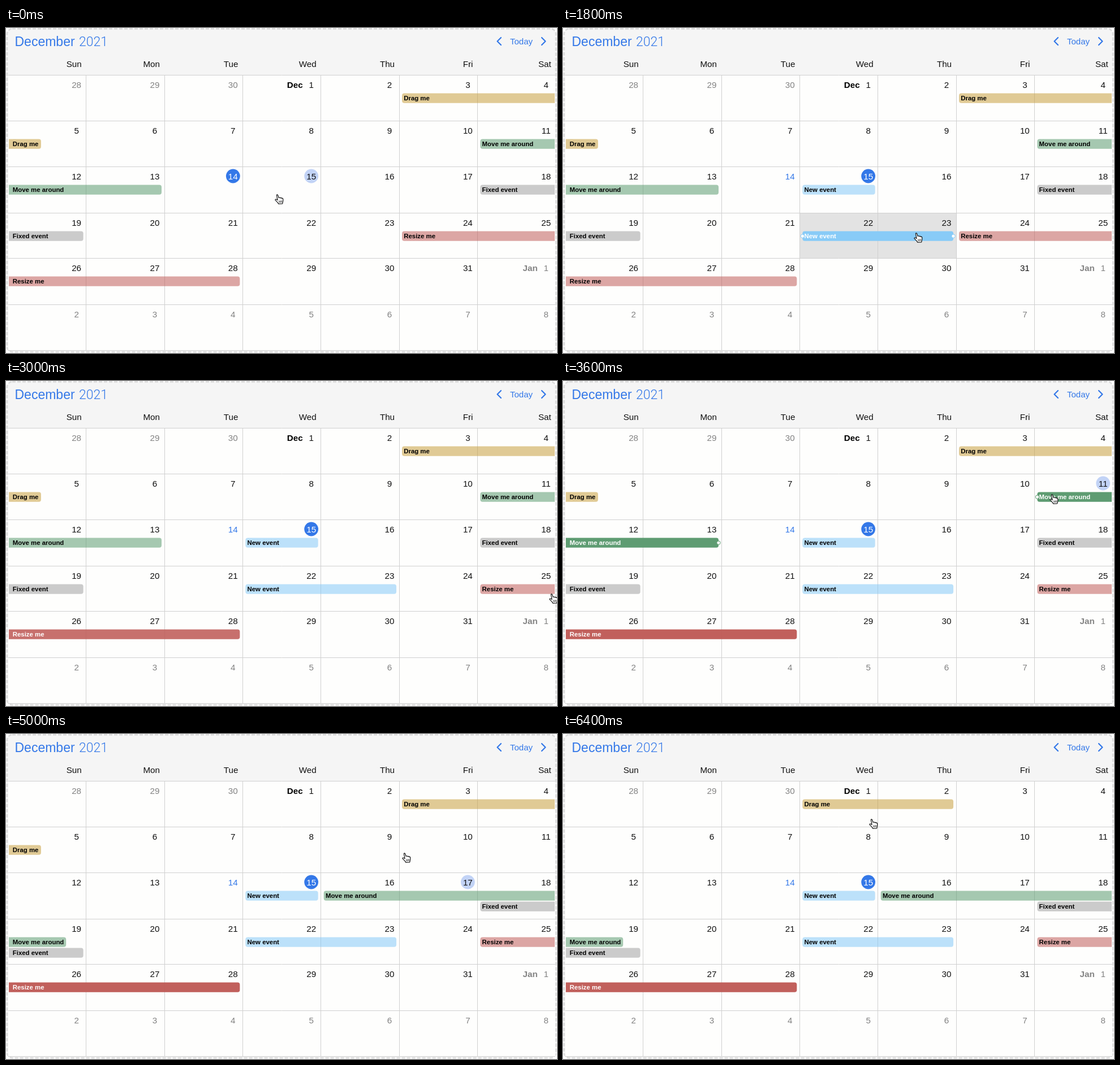
Animation of 974x575 px, one loop 6.6 s. Source, as an HTML page with a canvas:

```html
<!DOCTYPE html>
<html lang="en">
<head>
<meta charset="utf-8">
<title>Calendar</title>
<style>
html, body { margin: 0; width: 100%; height: 100%; overflow: hidden; background: #fff; }
canvas { display: block; width: 974px; height: 575px; }
</style>
</head>
<body>
<canvas id="stage" width="974" height="575"></canvas>
<script>
const ctx = document.getElementById('stage').getContext('2d');
const SANS = '"Liberation Sans", Arial, sans-serif';
const STEP = 200, STEPS = 33;
const BLUE = '#3478e8', MUTED = '#828282';
const LEFT = 3.3, COL = 138.35, EDGE_L = 5, EDGE_R = 970;
const ROWS = [83, 164, 245, 327, 407, 489, 570];
const DAYS = ['Sun', 'Mon', 'Tue', 'Wed', 'Thu', 'Fri', 'Sat'];
const COLORS = { tan: '#c7a03e', green: '#5b9b70', gray: '#a1a1a1', red: '#c05d59', blue: '#85caf8' };
const ALPHA = { normal: 0.54, selected: 0.98, drag: 0.96, ghost: 0.2 };

// Cursor keys: step, x, y
const PATH = [
  [0, 483, 303], [2, 483, 303], [5, 466, 350], [6, 462, 361], [7, 470, 364],
  [8, 580, 369], [9, 628, 371], [10, 665, 373], [11, 735, 376], [12, 787, 377],
  [13, 701, 369], [14, 860, 373], [15, 968, 385], [16, 960, 330], [17, 915, 240],
  [18, 868, 209], [19, 842, 270], [20, 714, 304], [21, 665, 303], [22, 668, 302],
  [23, 698, 280], [24, 708, 250], [25, 708, 219], [26, 718, 165], [27, 722, 129],
  [28, 718, 132], [29, 645, 145], [30, 553, 157], [32, 549, 159]
];

const HAND = new Path2D('M-4.5-6.5C-5-8.4-2.8-8.8-2.3-7L-.9-2.6C-.3-3.6 1.6-3.4 1.9-2.2C2.6-3.1 4.2-2.7 4.4-1.6' +
  'C5.3-2.2 6.7-1.5 6.7-.2C7.2 3 6.4 5 5.6 7.8L-1.2 8.2C-2 5.8-4.6 3.9-6.8 1.6C-7.6.2-5.6-.6-4.2.6L-3 1.4Z');
const FINGERS = new Path2D('M-.3 2.6L.2 6M2 2.4L2.3 6M4.2 2.2L4.3 5.6');
const ARROW = new Path2D('M0-7.5L3.2-4H1.1V-1.1H4V-3.2L7.5 0L4 3.2V1.1H1.1V4H3.2L0 7.5L-3.2 4H-1.1V1.1H-4V3.2L-7.5 0L-4-3.2V-1.1H-1.1V-4H-3.2Z');

const colX = c => LEFT + COL * c;
const between = (k, a, b) => k >= a && k <= b;

function cursorAt(k) {
  const i = PATH.findIndex(p => p[0] >= k);
  if (i < 1) return PATH[0].slice(1);
  const [ka, xa, ya] = PATH[i - 1], [kb, xb, yb] = PATH[i];
  const u = (k - ka) / (kb - ka);
  return [xa + (xb - xa) * u, ya + (yb - ya) * u];
}

function cellAt(x, y) {
  const row = ROWS.findIndex((top, i) => y >= top && y < ROWS[i + 1]);
  return row * 7 + Math.min(6, Math.floor((x - LEFT) / COL));
}

const dragging = k => between(k, 7, 9) || k === 14 || moving(k);
const moving = k => between(k, 19, 21) || between(k, 28, 31);

// Days count from the first cell; an end is exclusive and may be fractional.
function eventsAt(k) {
  const list = [];
  const add = (title, color, start, end, mode = 'normal', slot = 0) =>
    list.push({ title, color, start, end, mode, slot });

  add('Fixed event', 'gray', 20, 22, 'normal', k >= 22 ? 1 : 0);
  if (k >= 1) add('New event', 'blue', 17, 18, between(k, 1, 2) ? 'selected' : 'normal');
  if (k >= 7) add('New event', 'blue', 24, k < 8 ? 25 : 26, k < 10 ? 'drag' : 'normal');

  if (k === 14) add('Resize me', 'red', 26, 31, 'ghost');
  add('Resize me', 'red', k < 14 ? 26 : 27, 31,
    between(k, 12, 13) ? 'selected' : k === 14 ? 'drag' : 'normal');

  const moveTitle = 'Move me around';
  if (k < 19) add(moveTitle, 'green', 13, 16, k === 18 ? 'selected' : 'normal');
  else if (k < 22) {
    const start = cellAt(...cursorAt(k));
    add(moveTitle, 'green', 13, 16, 'ghost');
    add(moveTitle, 'green', start, start + 3, 'drag');
  } else add(moveTitle, 'green', 18, 21.78);

  if (k < 28) add('Drag me', 'tan', 5, 7.46, k === 27 ? 'selected' : 'normal');
  else if (k < 32) {
    const start = cellAt(...cursorAt(k));
    add('Drag me', 'tan', 5, 7.46, 'ghost');
    add('Drag me', 'tan', start, start + 2.46, 'drag');
  } else add('Drag me', 'tan', 3, 5);
  return list;
}

function text(str, x, y, size, color, align = 'left', weight = 400, family = SANS) {
  ctx.font = `${weight} ${size}px ${family}`;
  ctx.textAlign = align;
  ctx.fillStyle = color;
  ctx.fillText(str, x, y);
}

function disc(x, y, r, fill) {
  ctx.beginPath();
  ctx.arc(x, y, r, 0, Math.PI * 2);
  ctx.fillStyle = fill;
  ctx.fill();
}

function line(points, color, width) {
  ctx.beginPath();
  points.forEach(([x, y]) => ctx.lineTo(x, y));
  ctx.strokeStyle = color;
  ctx.lineWidth = width;
  ctx.stroke();
}

function drawFrame() {
  ctx.fillStyle = '#fff';
  ctx.fillRect(0, 0, 974, 575);
  ctx.beginPath();
  ctx.roundRect(2, 1.5, 970, 571.5, 9);
  ctx.fillStyle = '#f5f5f5';
  ctx.fill();
  ctx.setLineDash([6, 3]);
  ctx.strokeStyle = '#dcdcdc';
  ctx.lineWidth = 2.5;
  ctx.stroke();
  ctx.setLineDash([]);

  text('December', 15.5, 31.5, 23, BLUE);
  text('2021', 129, 31.5, 23, BLUE, 'left', 300, 'Roboto, sans-serif');
  text('Today', 911, 28.5, 15, BLUE, 'center');
  ctx.lineCap = ctx.lineJoin = 'round';
  line([[875, 17], [868.5, 23.5], [875, 30]], BLUE, 2.2);
  line([[947, 17], [953.5, 23.5], [947, 30]], BLUE, 2.2);
  DAYS.forEach((day, c) => text(day, colX(c + 1) - 8, 68.5, 15.2, '#111', 'right'));
}

function drawGrid(events) {
  ctx.fillStyle = '#fefefd';
  ctx.fillRect(4, 83, 967, 487);
  ctx.fillStyle = '#e3e3e3';
  for (const e of events) {
    if (e.mode !== 'drag') continue;
    for (let i = e.start; i < e.end; i++) {
      const r = Math.floor(i / 7);
      ctx.fillRect(colX(i % 7), ROWS[r], COL, ROWS[r + 1] - ROWS[r]);
    }
  }
  ctx.lineCap = 'butt';
  for (const y of ROWS) line([[4, y + 0.5], [971, y + 0.5]], '#d0d0d0', 1);
  for (let c = 1; c < 7; c++) {
    const x = Math.floor(colX(c)) + 0.5;
    line([[x, 83], [x, 570]], '#d0d0d0', 1);
  }
}

function drawDates(k) {
  const selected = k < 1 ? 16 : 17;
  const hover = dragging(k) || dragging(k - 1) ? -1 : cellAt(...cursorAt(Math.max(0, k - 1)));
  const hovered = k === 0 ? 17 : hover;
  for (let i = 0; i < 42; i++) {
    const x = colX(i % 7) + 121.3, top = ROWS[Math.floor(i / 7)];
    const outside = i < 3 || i > 33;
    const date = i < 3 ? 28 + i : i < 34 ? i - 2 : i - 33;
    let color = outside ? MUTED : '#111';
    if (i === 16) color = BLUE;
    if (i === selected) {
      disc(x, top + 17, 12.4, BLUE);
      color = '#fff';
    } else if (i === hovered) disc(x, top + 17, 12.4, '#c2d3f6');
    text(date, x, top + 22.5, 15.2, color, 'center');
    if (date === 1) text(i === 3 ? 'Dec' : 'Jan', x - 15, top + 22.5, 15.2, outside ? MUTED : '#000', 'right', 700);
  }
}

function drawHandle(x, y, color) {
  disc(x, y, 3.2, '#fff');
  ctx.strokeStyle = color;
  ctx.lineWidth = 1;
  ctx.stroke();
}

function drawEvent(e, k) {
  const firstRow = Math.floor(e.start / 7), lastRow = Math.floor((e.end - 0.001) / 7);
  for (let r = firstRow; r <= lastRow; r++) {
    const opens = r === firstRow, closes = r === lastRow;
    const x = opens ? colX(e.start - r * 7) + 5 : EDGE_L;
    const right = closes ? colX(e.end - r * 7) - 5 : EDGE_R;
    const y = ROWS[r] + 32.5 + e.slot * 19;
    const strong = e.mode === 'selected' || e.mode === 'drag';
    const staysLit = e.color === 'red' && k >= 15 && !opens;
    const color = COLORS[e.color];
    ctx.globalAlpha = staysLit ? (k === 15 ? 0.88 : 0.98) : ALPHA[e.mode];
    ctx.beginPath();
    ctx.roundRect(x, y, right - x, 17.3, [opens ? 4 : 0, closes ? 4 : 0, closes ? 4 : 0, opens ? 4 : 0]);
    ctx.fillStyle = color;
    ctx.fill();
    ctx.globalAlpha = e.mode === 'ghost' ? 0.35 : 1;
    text(e.title, opens ? x + 3.2 : 11.8, y + 12.6, 11.4, strong || staysLit ? '#fff' : '#000', 'left', 700);
    ctx.globalAlpha = 1;
    if (strong && opens) drawHandle(x, y + 8.7, color);
    if (strong && closes) drawHandle(right, y + 8.7, color);
  }
}

function drawCursor(k) {
  const [x, y] = cursorAt(k);
  ctx.save();
  ctx.translate(x, y);
  ctx.lineJoin = 'round';
  if (moving(k)) {
    ctx.strokeStyle = '#fff';
    ctx.lineWidth = 2;
    ctx.stroke(ARROW);
    ctx.fillStyle = '#111';
    ctx.fill(ARROW);
  } else {
    ctx.fillStyle = '#fff';
    ctx.fill(HAND);
    ctx.strokeStyle = '#111';
    ctx.lineWidth = 1.2;
    ctx.stroke(HAND);
    ctx.lineWidth = 0.9;
    ctx.stroke(FINGERS);
  }
  ctx.restore();
}

function render(ms) {
  const k = Math.floor(ms / STEP) % STEPS;
  const events = eventsAt(k);
  drawFrame();
  drawGrid(events);
  drawDates(k);
  events.forEach(e => drawEvent(e, k));
  drawCursor(k);
}

let began;
function tick(now) {
  began ??= now;
  render(Math.max(0, now - began));
  requestAnimationFrame(tick);
}
render(0);
requestAnimationFrame(tick);
</script>
</body>
</html>
```
